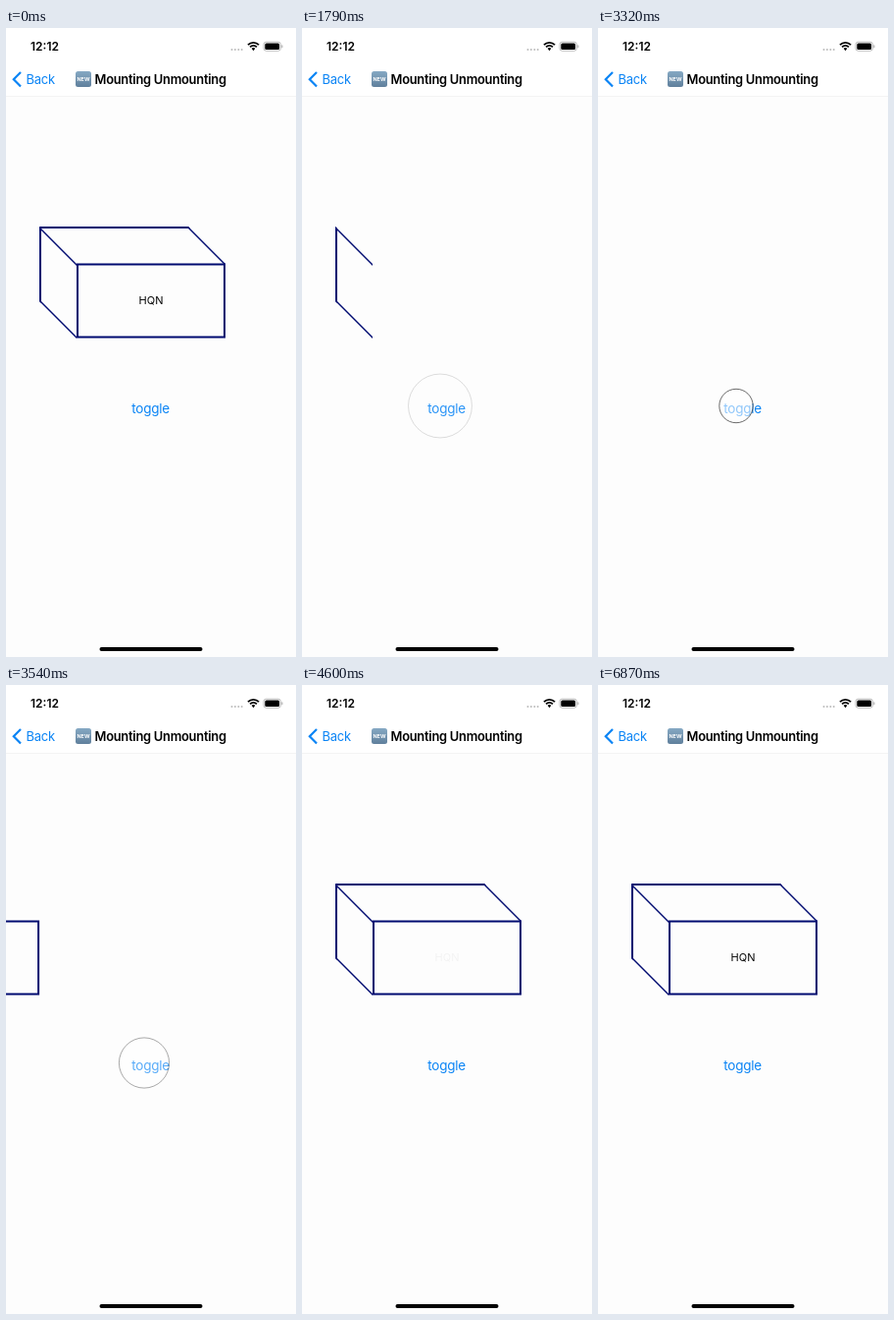
An HTML page with a canvas for the animation above (7170 ms loop, 296 by 640 pixels).

```html
<!DOCTYPE html>
<html lang="en">
<head>
<meta charset="utf-8">
<title>Mounting Unmounting</title>
<style>
  html, body { margin: 0; width: 100%; height: 100%; overflow: hidden; background: #fff; }
  canvas { display: block; width: 296px; height: 640px; }
</style>
</head>
<body>
<canvas id="stage"></canvas>
<script>
const W = 296, H = 640, LOOP = 7170;
const NAVY = '#000a70', BLUE = '#0a84f5';
const SLIDE = 300;
const OUT = 1559, IN = 3413;               // moments the button is released
const SIDE_OUT = OUT + 300, SIDE_IN = 3717;
const FADE_IN = 4150, FADE = 3000;

// The screen refreshes only at these moments.
const TICKS = [0, 1460, 1570, 1680, 1790, 1910, 2020, 3320, 3430, 3540, 3650,
  3800, 3920, 4040, 4600, 4820, 5030, 5250, 5360, 5470, 5570, 5680, 5780, 5880,
  5990, 6100, 6210, 6410, 6630, 6870];

const canvas = document.getElementById('stage');
const ctx = canvas.getContext('2d');
const dpr = window.devicePixelRatio || 1;
canvas.width = W * dpr;
canvas.height = H * dpr;

const clamp = v => Math.max(0, Math.min(1, v));
const easeInOut = p => p < 0.5 ? 2 * p * p : 1 - 2 * (1 - p) * (1 - p);
const progress = (t, start, length) => easeInOut(clamp((t - start) / length));
const lastTick = t => TICKS.filter(k => k <= t).pop();

function poly(color, ...pts) {
  ctx.fillStyle = color;
  ctx.beginPath();
  for (let i = 0; i < pts.length; i += 2) ctx.lineTo(pts[i], pts[i + 1]);
  ctx.fill();
}

function pill(x, y, w, h, r, color) {
  ctx.fillStyle = color;
  ctx.beginPath();
  ctx.roundRect(x, y, w, h, r);
  ctx.fill();
}

function text(str, x, y, size, color, weight = 400, align = 'left', track = -0.02) {
  ctx.font = `${weight} ${size}px Inter, Roboto, sans-serif`;
  ctx.letterSpacing = `${track * size}px`;
  ctx.textAlign = align;
  ctx.fillStyle = color;
  ctx.fillText(str, x, y);
}

function shifted(dx, dy, draw) {
  ctx.save();
  ctx.translate(dx, dy);
  draw();
  ctx.restore();
}

function side() {
  poly(NAVY, 34, 202, 36, 204, 36, 280, 34, 278);
  poly(NAVY, 34, 202, 72, 240, 72, 242, 34, 204);
  poly(NAVY, 34, 276, 72, 314, 72, 316, 34, 278);
}

function lid() {
  poly(NAVY, 34, 202, 186, 202, 188, 204, 36, 204);
  poly(NAVY, 184, 202, 186, 202, 224, 240, 222, 240);
}

function front(labelAlpha) {
  ctx.strokeStyle = NAVY;
  ctx.lineWidth = 2;
  ctx.strokeRect(73, 240.5, 150, 74);
  text('HQN', 148, 281, 11, `rgba(0,0,0,${labelAlpha})`, 400, 'center', 0);
}

function box(t) {
  const leaving = t < 2500;
  const main = leaving ? progress(t, OUT, SLIDE) : 1 - progress(t, IN, SLIDE);
  const late = leaving ? progress(t, SIDE_OUT, SLIDE) : 1 - progress(t, SIDE_IN, SLIDE);
  const label = leaving ? 1 : progress(t, FADE_IN, FADE);
  const dir = leaving ? 1 : -1;
  shifted(-dir * late * W, 0, side);
  shifted(0, -main * H, lid);
  shifted(dir * main * W, 0, () => front(label));
}

function touch(t, press, release) {
  const p = clamp((t - release) / 300);
  if (t < press || p >= 1) return;
  ctx.beginPath();
  ctx.arc(141, 384.5, 17.2 + 19.8 * p, 0, Math.PI * 2);
  ctx.fillStyle = `rgba(255,255,255,${0.55 * (1 - p)})`;
  ctx.fill();
  ctx.strokeStyle = `rgba(0,0,0,${0.58 * (1 - p)})`;
  ctx.lineWidth = 1;
  ctx.stroke();
}

function statusBar() {
  text('12:12', 25, 23, 12, '#000', 600, 'left', 0);
  for (let i = 0; i < 4; i++) pill(229.5 + i * 3.4, 21, 2, 2, 1, '#bdbdbd');

  ctx.strokeStyle = '#000';
  ctx.lineWidth = 1.9;
  for (const r of [7.8, 4.8]) {
    ctx.beginPath();
    ctx.arc(252.5, 22.7, r, -Math.PI * 0.75, -Math.PI * 0.25);
    ctx.stroke();
  }
  ctx.beginPath();
  ctx.moveTo(252.5, 23.2);
  ctx.arc(252.5, 22.7, 2.6, -Math.PI * 0.75, -Math.PI * 0.25);
  ctx.fillStyle = '#000';
  ctx.fill();

  ctx.strokeStyle = '#a6a6a6';
  ctx.lineWidth = 0.8;
  ctx.beginPath();
  ctx.roundRect(263, 14.2, 17.4, 9, 2.6);
  ctx.stroke();
  pill(264.3, 15.5, 14.8, 6.4, 1.5, '#000');
  pill(281.4, 17.2, 1, 3, 0.5, '#a6a6a6');
}

function header() {
  ctx.fillStyle = '#fff';
  ctx.fillRect(0, 0, W, 69);
  ctx.fillStyle = '#f3f3f3';
  ctx.fillRect(0, 69, W, 1);
  statusBar();

  ctx.strokeStyle = BLUE;
  ctx.lineWidth = 2.2;
  ctx.beginPath();
  ctx.moveTo(15, 45);
  ctx.lineTo(7.8, 52.3);
  ctx.lineTo(15, 59.6);
  ctx.stroke();
  text('Back', 20.5, 57, 13, BLUE);

  const shade = ctx.createLinearGradient(0, 44, 0, 60);
  shade.addColorStop(0, '#86a9c4');
  shade.addColorStop(1, '#5f7f9c');
  pill(71, 44, 16, 16, 2.5, shade);
  text('NEW', 79, 54, 5.4, '#fff', 700, 'center', 0);

  text('Mounting Unmounting', 90.5, 57, 12.9, '#000', 600);
}

function render(t) {
  ctx.setTransform(dpr, 0, 0, dpr, 0, 0);
  ctx.fillStyle = '#fdfdfd';
  ctx.fillRect(0, 0, W, H);
  box(t);
  text('toggle', 128.3, 391.5, 13.5, BLUE);
  header();
  touch(t, 1460, OUT);
  touch(t, 3320, IN);
  pill(95.5, 630, 105, 4, 2, '#000');
}

const start = performance.now();
function frame() {
  render(lastTick((performance.now() - start) % LOOP));
  requestAnimationFrame(frame);
}
frame();
</script>
</body>
</html>
```
